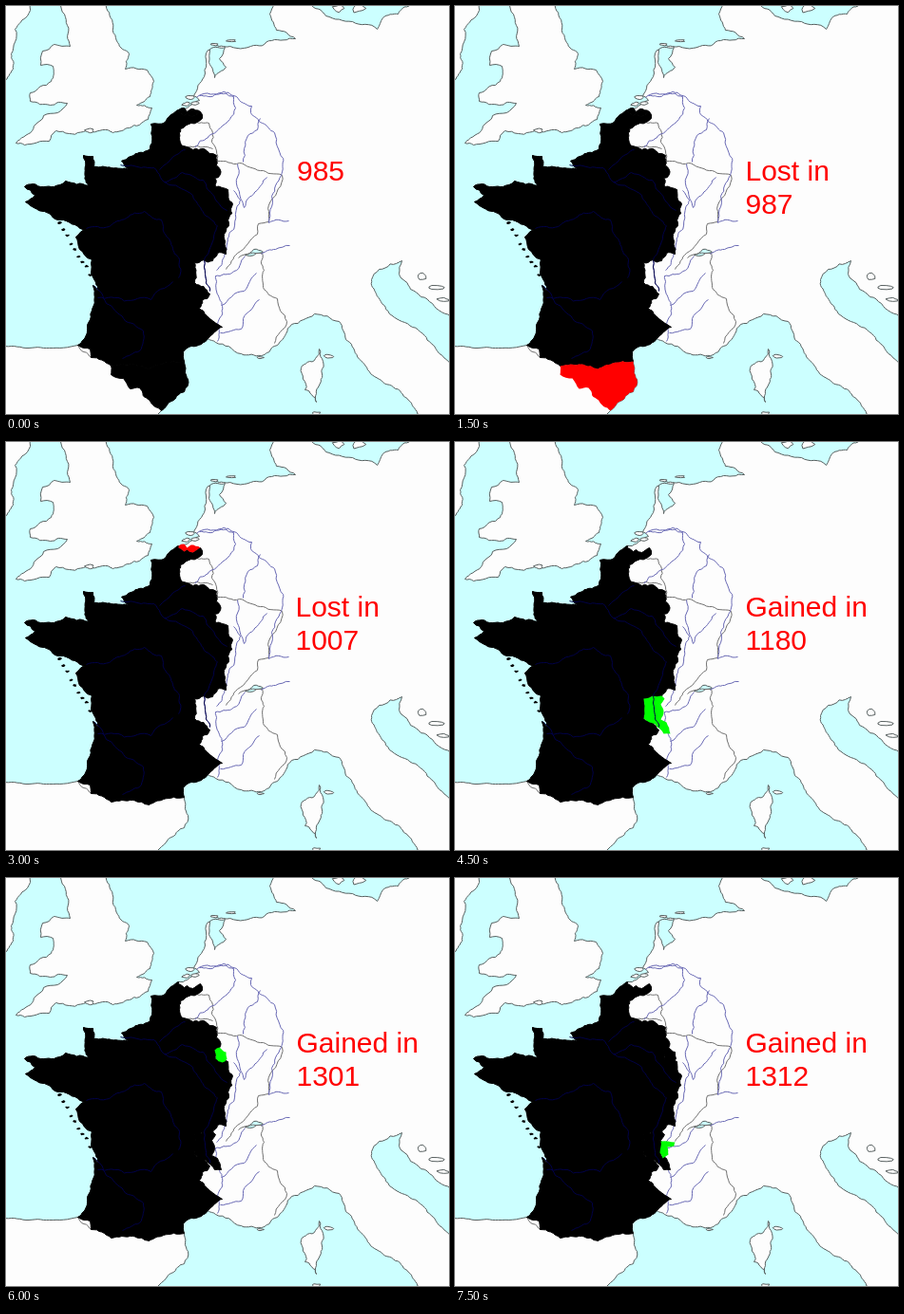
Write an HTML page with a canvas that moves like this. It is 466 px wide and 430 px high and loops after 8000 ms.

```html
<!DOCTYPE html>
<html lang="en">
<head>
<meta charset="utf-8">
<title>Border changes</title>
<style>
  html, body { margin: 0; width: 100%; height: 100%; overflow: hidden; background: #ccffff; }
  canvas { display: block; }
</style>
</head>
<body>
<canvas id="map" width="466" height="430"></canvas>
<script>
const ctx = document.getElementById('map').getContext('2d');
const SEA = '#ccffff', LAND = '#fdfdfd', COAST = '#586060', BORDER = '#707070';
const RIVER = '#6868b4', DARK_RIVER = '#000048', BLACK = '#000', RED = '#ff0000', GREEN = '#00ff00';
const STEP = 1500, LOOP = 8000;

// Depends only on position, so shared borders coincide.
function noise(x, y) {
  const n = Math.sin(x * 12.9898 + y * 78.233) * 43758.5453;
  return (n - Math.floor(n)) * 2 - 1;
}

// Midpoint displacement between two key points, without the first one.
function fractal(a, b, bend) {
  const dx = b[0] - a[0], dy = b[1] - a[1], len = Math.hypot(dx, dy);
  if (len < 4) return [b];
  const k = noise(a[0] + b[0], a[1] + b[1]) * Math.min(bend, 2.5 / len);
  const mid = [(a[0] + b[0]) / 2 - dy * k, (a[1] + b[1]) / 2 + dx * k];
  return [...fractal(a, mid, bend), ...fractal(mid, b, bend)];
}

function path(text, bend = 0.13) {
  const keys = text.trim().split(/\s+/).map(p => p.split(',').map(Number));
  return keys.flatMap((p, i) => i ? fractal(keys[i - 1], p, bend) : [p]);
}

function blob(x, y, rx, ry) {
  return Array.from({ length: 9 }, (_, i) => {
    const a = i / 9 * Math.PI * 2, r = 1 + 0.35 * noise(x + i, y);
    return [x + Math.cos(a) * rx * r, y + Math.sin(a) * ry * r];
  });
}

function trace(points) {
  ctx.beginPath();
  points.forEach(([x, y]) => ctx.lineTo(x + 0.5, y + 0.5));
}

function area(points, fill, stroke) {
  trace(points);
  ctx.closePath();
  ctx.fillStyle = fill;
  ctx.fill();
  if (stroke) { ctx.strokeStyle = stroke; ctx.stroke(); }
}

function line(points, color) {
  trace(points);
  ctx.strokeStyle = color;
  ctx.stroke();
}

// Coasts
const britain = path(`55,-3 64,20 67,42 50,40 38,47 36,62 49,63 47,79 25,91 25,100 46,104 64,102
  54,112 39,115 27,131 10,144 19,146 45,142 52,131 66,134 90,132 112,133 129,128 149,119
  153,107 137,104 151,95 155,79 148,67 125,66 129,50 117,38 103,-3`);
const ireland = path('-3,-3 25,-3 22,10 9,24 5,50 7,66 -3,79');
const corsica = path('329,361 332,382 326,417 314,404 310,381 325,371 329,361', 0.2);
const northSea = path(`281,-3 277,8 284,25 304,34 279,36 257,42 228,42 212,46 208,74 197,94
  203,99 190,107 181,109`);
const channel = path(`181,109 167,122 152,124 151,150 121,163 129,171 92,169 91,158 81,157 86,189
  62,184 50,190 28,187`);
const biscay = path(`28,187 19,190 30,199 20,206 40,216 60,225 84,235 73,243 77,256 90,267
  89,282 97,300 91,294 85,342 75,357`);
const catalanCoast = path('187,374 191,393 187,406 163,426');
const gulf = path('187,374 186,364 205,356 212,350');
const southCoast = path(`212,350 220,354 247,366 268,368 294,345 300,335 324,324 350,332 357,351
  380,383 414,405 436,432`);
const adriatic = path(`470,385 453,363 440,347 419,333 399,319 389,303 384,288 392,277 416,268
  413,282 425,298 448,313 470,328`);
const baltic = path('428,-3 412,8 396,12 390,24 364,16 336,10 319,-3');
const continent = [...northSea, ...channel, ...biscay, ...path('75,357 45,360 -4,358', 0.04), [-4, 434],
  [155, 434], ...[...catalanCoast].reverse(), ...gulf, ...southCoast, [470, 434], ...adriatic, [470, -4], ...baltic];

const bay = path('214,45 230,43 224,55 231,64 219,75 213,59 214,45');
const lake = path('251,262 260,256 270,259 256,263');
const islands = [[189, 103, 4, 2], [193, 96, 4, 2], [198, 102, 4, 2], [219, 40, 4, 1], [236, 36, 5, 1],
  [87, 131, 5, 2], [370, 2, 7, 4], [349, 2, 5, 4], [437, 284, 5, 4], [452, 296, 8, 2], [459, 309, 7, 2],
  [326, 429, 5, 2], [267, 370, 3, 1], [340, 369, 5, 2]].map(b => blob(...b));
const islets = Array.from({ length: 9 }, (_, i) =>
  blob(56 + i * 4, 229 + i * 6.6 + 2 * noise(i, 3), 2, 1.3));

const borders = ['222,163 245,165 290,178', '290,178 278,205 276,227 265,229 264,240 243,260 231,277',
  '244,265 269,260 270,296 285,308 295,332 282,355', '183,145 217,150', '75,357 89,370',
  '197,121 213,123 216,143 222,163'].map(p => path(p));
const rivers = ['200,96 224,91 242,95 258,105 257,112 282,133 291,160 289,178 279,200 276,228 297,226',
  '203,94 239,95 241,107 225,128 198,148', '267,118 264,130 254,136 249,164',
  '243,166 244,193 250,212 274,180', '239,194 246,204 229,264 221,278', '268,261 283,256 298,252',
  '251,263 237,281 220,284 227,316 222,353', '263,281 250,300 226,315', '266,309 249,329 247,340 225,344',
  '208,267 209,282 214,300'].map(p => path(p));
const darkRivers = ['120,167 155,170 171,188 196,199 221,231', '166,185 185,175 207,183 232,215',
  '161,172 188,151', '84,234 108,232 145,216 163,225 166,239 182,267 181,286',
  '92,294 105,313 144,342 140,363 122,371', '96,307 152,309 175,290', '208,267 222,231',
  '208,267 209,282 214,300'].map(p => path(p));

// Kingdom limits
const mountains = path('75,357 88,361 89,370 110,379', 0.1);
const pyrenees = path('110,379 133,377 150,382 165,376 187,374', 0.1);
const eastEdge = path(`227,338 203,318 206,310 214,303 198,291 198,270 217,268 222,260 231,261 229,240
  234,228 238,208 233,193 220,190 219,181 225,177 221,157 208,150 185,147 183,129 206,118 204,111`, 0.2);
const sliverEdge = path('204,111 196,116 190,113 187,115 181,111');
const core = [...channel, ...biscay, ...mountains, ...pyrenees, ...gulf, ...path('212,350 227,338'),
  ...eastEdge, ...sliverEdge];

const catalonia = [...pyrenees, ...catalanCoast, ...path('163,426 140,402 130,403 123,392 110,388 110,379')];
const sliver = [...sliverEdge, ...path('181,109 187,107 190,111 194,108 204,111')];
const rhone = path('198,270 217,267 220,270 216,276 219,284 216,292 222,295 226,307 219,307 210,297 198,291 198,270', 0.08);
const duchy = path('219,181 224,178 231,183 232,190 227,194 220,190 219,181');
const city = path('216,277 231,278 230,282 223,283 224,291 218,295 215,289 216,277', 0.08);

const steps = [
  { year: '985', x: 306 },
  { year: '987', word: 'Lost in', x: 305.5, region: catalonia, lost: true },
  { year: '1007', word: 'Lost in', x: 304.5, region: sliver, lost: true },
  { year: '1180', word: 'Gained in', x: 305.5, region: rhone },
  { year: '1301', word: 'Gained in', x: 305.5, region: duchy },
  { year: '1312', word: 'Gained in', x: 305.5, region: city }
];

function drawLand() {
  ctx.fillStyle = SEA;
  ctx.fillRect(0, 0, 466, 430);
  [continent, britain, ireland, corsica, ...islands].forEach(p => area(p, LAND, COAST));
  [bay, lake].forEach(p => area(p, SEA, COAST));
  borders.forEach(p => line(p, BORDER));
  rivers.forEach(p => line(p, RIVER));
}

function drawKingdom(now) {
  area(core, BLACK, BLACK);
  islets.forEach(p => area(p, BLACK));
  steps.forEach(({ region, lost }, i) => {
    if (!region) return;
    if (i === now) area(region, lost ? RED : GREEN);
    else if (lost ? i > now : i < now) area(region, BLACK, BLACK);
  });
  darkRivers.forEach(p => line(p, DARK_RIVER));
}

function drawLabel({ word, year, x }) {
  ctx.fillStyle = RED;
  ctx.font = '30px "Liberation Sans", Arial, sans-serif';
  const lines = word ? [word, year] : [year];
  lines.forEach((text, i) => ctx.fillText(text, x, 184 + i * 35));
}

let shown = -1;
function frame() {
  const now = Math.floor((performance.now() % LOOP) / STEP);
  if (now !== shown) {
    shown = now;
    drawLand();
    drawKingdom(now);
    drawLabel(steps[now]);
  }
  requestAnimationFrame(frame);
}
frame();
</script>
</body>
</html>
```
